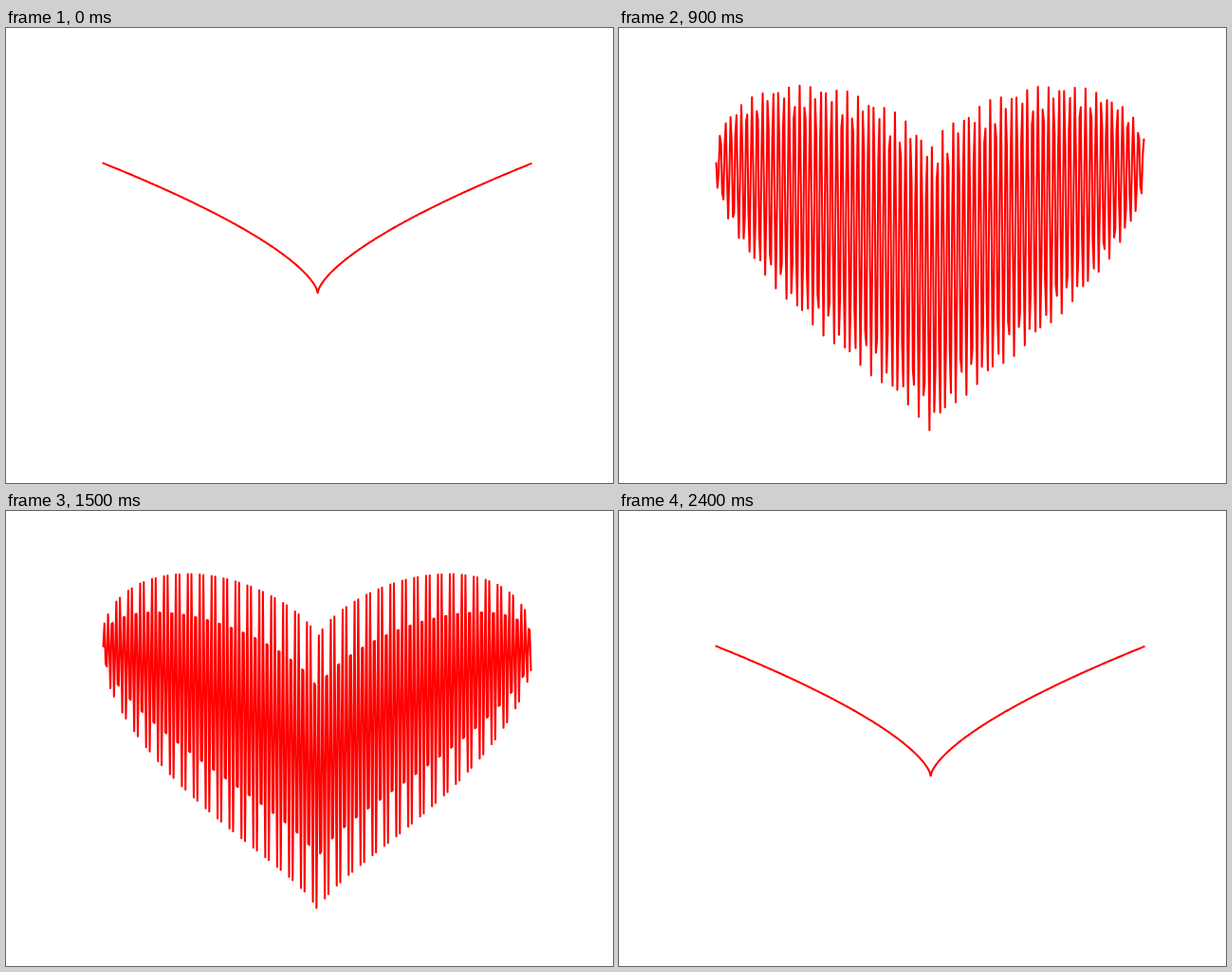
Recreate the animation shown at these times as an HTML page with a canvas. Size 640 by 480 pixels, loop 2.7 s.

```html
<!DOCTYPE html>
<html lang="en">
<head>
<meta charset="utf-8">
<title>Heart curve</title>
<style>
  html, body { margin: 0; width: 100%; height: 100%; overflow: hidden; background: #fff; }
  canvas { display: block; }
</style>
</head>
<body>
<canvas id="stage" width="640" height="480"></canvas>
<script>
// y = |x|^(2/3) + 0.9 sqrt(3.3 - x^2) sin(k pi x), sampled coarsely so that high k aliases
const STEPS = [0, 15, 30, 45, 50, 60, 75, 90, 100];
const HOLD = 300;
const PLOT = { left: 80, top: 57.6, width: 496, height: 369.6 };
const MIN = -180, MAX = 179; // sample range in hundredths

const ctx = document.getElementById('stage').getContext('2d');
const span = PLOT.width / 1.1;
const px = n => PLOT.left + span * (0.05 + (n - MIN) / (MAX - MIN));
const py = y => PLOT.top + PLOT.height * (2.4 - y) / 4;

function heart(n, k) {
  const x = n / 100;
  return Math.cbrt(x * x) + 0.9 * Math.sqrt(3.3 - x * x) * Math.sin(k * Math.PI * x);
}

function draw(k) {
  ctx.clearRect(0, 0, 640, 480);
  ctx.beginPath();
  for (let n = MIN; n <= MAX; n++) ctx.lineTo(px(n), py(heart(n, k)));
  ctx.stroke();
}

ctx.beginPath();
ctx.rect(PLOT.left, PLOT.top, PLOT.width, PLOT.height);
ctx.clip();
ctx.strokeStyle = '#f00';
ctx.lineWidth = 2.08;
ctx.lineJoin = 'round';
ctx.lineCap = 'square';

const start = performance.now();
function tick() {
  const t = Math.max(0, performance.now() - start);
  draw(STEPS[Math.floor(t / HOLD) % STEPS.length]);
  requestAnimationFrame(tick);
}
tick();
</script>
</body>
</html>
```
